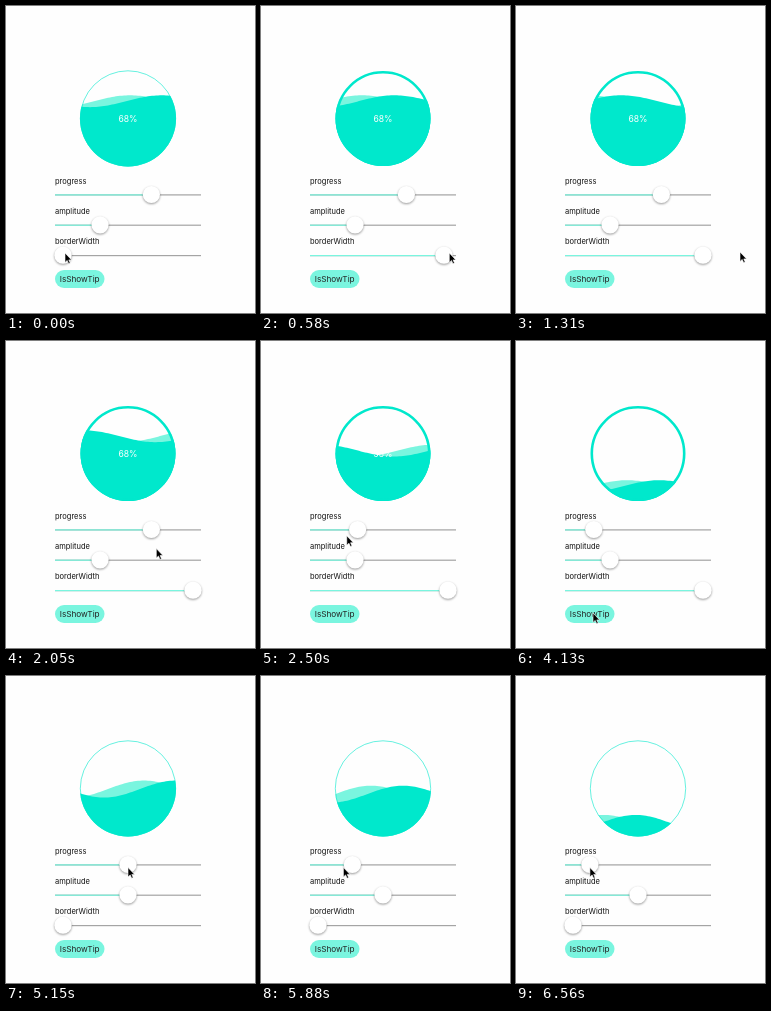
An HTML page for the animation above (6660 ms loop, 249x307 px).

```html
<!DOCTYPE html>
<html lang="en">
<head>
<meta charset="utf-8">
<title>Wave progress</title>
<style>
  html, body { margin: 0; width: 100%; height: 100%; overflow: hidden; background: #fefefe; }
  svg { display: block; width: 249px; height: 307px; font: 7.5px Inter, sans-serif; }
  .main { fill: #00e8cc; }
  .light { fill: #7af5df; }
  .thumb { fill: #fff; filter: drop-shadow(0 1.2px 1.3px #0006); }
</style>
</head>
<body>
<svg viewBox="0 0 249 307">
  <clipPath id="bowl"><circle id="bowlEdge" cx="122" cy="112.5"/></clipPath>
  <g clip-path="url(#bowl)">
    <path id="back" class="light"/>
    <path id="front" class="main"/>
  </g>
  <circle id="ring" cx="122" cy="112.5" fill="none" stroke="#00e8cc"/>
  <text id="tip" x="122" y="116" font-size="8.6" text-anchor="middle"></text>
  <g id="sliders"></g>
  <rect class="light" x="49" y="264" width="49.5" height="18" rx="9"/>
  <text x="53.7" y="276.2" font-size="8.2" fill="#222">IsShowTip</text>
  <path id="cursor" d="M0 0V9.5L2.2 7.4 3.7 10.8 5.2 10.1 3.8 6.9H6.6Z" stroke="#fff" stroke-width=".6"/>
</svg>
<script>
const $ = id => document.getElementById(id);
const LOOP = 6660, STEP = 146.5, LAST = 44;
const WAVELENGTH = 144, RADIUS = 48, CENTER_Y = 112.5;
const TIP_OFF = 26, CUT = 30;

const sliders = {
  progress: { y: 188.8, value: .68 },
  amplitude: { y: 219.1, value: .285 },
  borderWidth: { y: 249.5, value: 0 }
};

const drags = [
  { slider: 'borderWidth', start: 1, end: 5, to: 1 },
  { slider: 'progress', start: 15, end: 20, to: .16 },
  { slider: 'borderWidth', start: 28, end: 29, to: 0 },
  { slider: 'amplitude', start: 29, end: 30, to: .5 },
  { slider: 'progress', start: 30, end: 33, to: .5 },
  { slider: 'progress', start: 39, end: 42, to: .13 }
];

// Where the pointer stays: x and y are relative to the slider's thumb, if any.
const stays = [
  { start: 0, end: 6, slider: 'borderWidth', x: 2, y: -2.5 },
  { start: 9, end: 11, x: 224, y: 246 },
  { start: 15, end: 21, slider: 'progress', x: -4, y: 6 },
  { start: 25, end: 28, x: 77, y: 272 },
  { start: 29, end: 29, slider: 'borderWidth', x: 0, y: 0 },
  { start: 30, end: 30, slider: 'amplitude', x: 0, y: 0 },
  { start: 31, end: LAST, slider: 'progress', x: 0, y: 2.7 }
];

const mix = (a, b, u) => a + (b - a) * u;
const easeOut = u => 1 - (1 - Math.min(1, Math.max(0, u))) ** 2.5;
const thumbX = value => 57 + 130 * value;

const valueAt = (name, step) => drags
  .filter(drag => drag.slider === name)
  .reduce((value, { start, end, to }) => mix(value, to, easeOut((step - start) / (end - start))),
    sliders[name].value);

// The water trails the slider by averaging its recent values.
const levelAt = step =>
  [0, 1, 2, 3].reduce((sum, lag) => sum + valueAt('progress', step - lag), 0) / 4;

function stayPoint({ slider, x, y }, step) {
  // The hand leads the thumb by half a step.
  return slider ? [thumbX(valueAt(slider, step + .5)) + x, sliders[slider].y + y] : [x, y];
}

function pointerAt(step) {
  const index = stays.findLastIndex(stay => stay.start <= step);
  const stay = stays[index], next = stays[index + 1];
  if (step <= stay.end) return stayPoint(stay, step);
  const from = stayPoint(stay, stay.end), to = stayPoint(next, next.start);
  const u = (step - stay.end) / (next.start - stay.end);
  return from.map((v, i) => mix(v, to[i], u));
}

for (const [name, slider] of Object.entries(sliders)) {
  const group = document.createElementNS('http://www.w3.org/2000/svg', 'g');
  group.innerHTML = `
    <text x="49" y="${slider.y - 11.1}" fill="#111">${name}</text>
    <rect x="49" y="${slider.y - .5}" width="146" height="1.2" fill="#a4a4a4"/>
    <rect class="light" x="49" y="${slider.y - .5}" height="1.2"/>
    <circle class="thumb" cy="${slider.y - .3}" r="8.6"/>`;
  $('sliders').append(group);
  slider.fill = group.querySelector('.light');
  slider.thumb = group.querySelector('.thumb');
}

function wave(crest, level, height) {
  const base = CENTER_Y + RADIUS * (1 - 2 * level);
  let d = 'M72 162';
  for (let x = 72; x <= 172; x += 2)
    d += `L${x} ${base - height * Math.cos((x - crest) / WAVELENGTH * 2 * Math.PI)}`;
  return d + 'V162Z';
}

function draw(step) {
  const level = levelAt(step), border = valueAt('borderWidth', step);
  const height = 2.5 + 12 * valueAt('amplitude', step);
  const crest = 124 - 5.6 * step + (step >= CUT ? 66 : 0);
  const outer = RADIUS - .5 * border, line = mix(.6, 2.6, border);

  $('back').setAttribute('d', wave(crest, level, height));
  $('front').setAttribute('d', wave(crest + 32, level, height));
  $('bowlEdge').setAttribute('r', outer);
  $('ring').setAttribute('r', outer - line / 2);
  $('ring').setAttribute('stroke-width', line);

  $('tip').textContent = step < TIP_OFF ? Math.round(level * 100) + '%' : '';
  $('tip').setAttribute('fill', level >= .45 ? '#fff' : '#00e8cc');

  for (const [name, { fill, thumb }] of Object.entries(sliders)) {
    const x = thumbX(valueAt(name, step));
    fill.setAttribute('width', x - 49);
    thumb.setAttribute('cx', x);
  }
  $('cursor').setAttribute('transform', `translate(${pointerAt(step)})`);
}

const start = performance.now();
function tick() {
  const t = (performance.now() - start) % LOOP;
  draw(Math.min(LAST, Math.floor((t + 9) / STEP)));
  requestAnimationFrame(tick);
}
tick();
</script>
</body>
</html>
```
